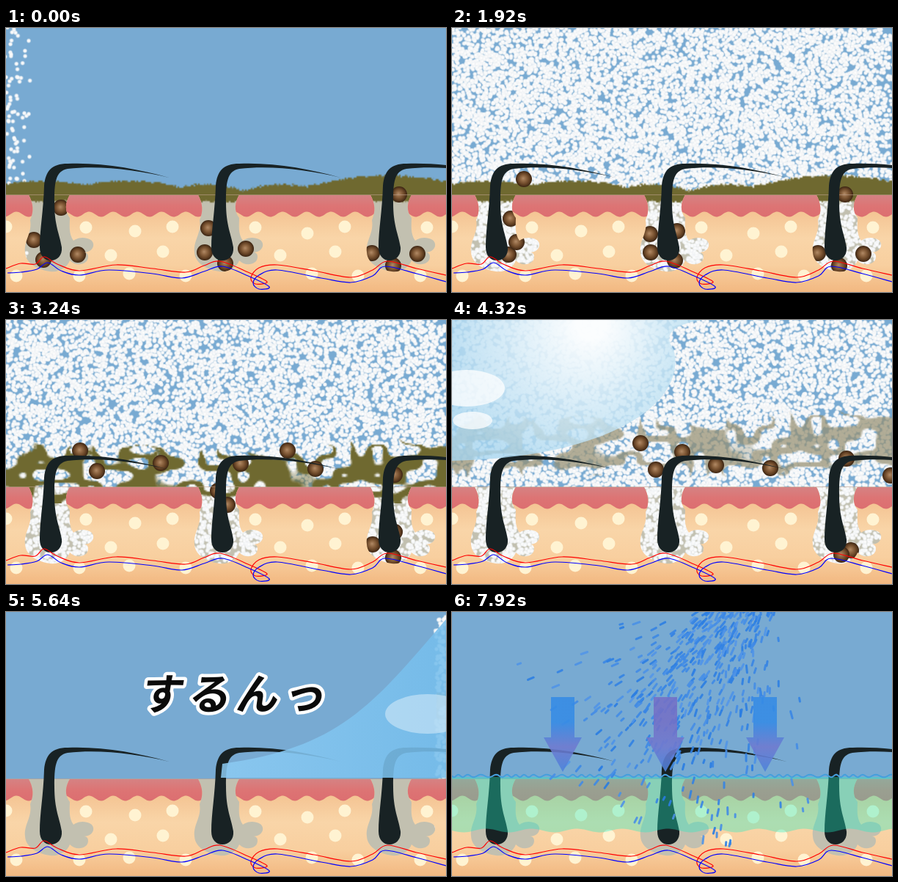
Animation, 600 px wide and 360 px high, one loop 8 s. Source, as an HTML page with a canvas:

```html
<!DOCTYPE html>
<html lang="ja">
<head>
<meta charset="utf-8">
<style>
html, body { margin: 0; width: 100%; height: 100%; overflow: hidden; background: #78aad2; }
canvas { display: block; }
</style>
</head>
<body>
<canvas id="stage" width="600" height="360"></canvas>
<script>
const W = 600, H = 360, LOOP = 8000, STEP = 120, SKIN_TOP = 228;
const ctx = document.getElementById('stage').getContext('2d');
const TAU = Math.PI * 2;
const clamp = (v, a = 0, b = 1) => Math.min(b, Math.max(a, v));
const ramp = (t, a, b) => clamp((t - a) / (b - a));
const mix = (a, b, k) => a + (b - a) * k;

let seed = 7;
function random() {
  seed = (seed + 0x6D2B79F5) | 0;
  let n = Math.imul(seed ^ (seed >>> 15), 1 | seed);
  n = (n + Math.imul(n ^ (n >>> 7), 61 | n)) ^ n;
  return ((n ^ (n >>> 14)) >>> 0) / 4294967296;
}
const hash = (x, y) => {
  const s = Math.sin(x * 127.1 + y * 311.7) * 43758.5453;
  return s - Math.floor(s);
};
function noise(x, y) {
  const ix = Math.floor(x), iy = Math.floor(y);
  const ease = v => v * v * (3 - 2 * v);
  const u = ease(x - ix), v = ease(y - iy);
  return 2 * mix(mix(hash(ix, iy), hash(ix + 1, iy), u),
                 mix(hash(ix, iy + 1), hash(ix + 1, iy + 1), u), v) - 1;
}
function makeCanvas(w, h) {
  const c = document.createElement('canvas');
  c.width = w; c.height = h;
  return c;
}
function gradient(g, ...colors) {
  colors.forEach((c, i) => g.addColorStop(i / (colors.length - 1), c));
  return g;
}
function ellipse(x, y, rx, ry, fill) {
  ctx.fillStyle = fill;
  ctx.beginPath();
  ctx.ellipse(x, y, rx, ry, 0, 0, TAU);
  ctx.fill();
}

// Skin
const PORE = new Path2D('M30 226C38 240 38 250 33 262C36 280 24 290 26 306C27 322 45 330 60 332' +
  'C72 334 84 326 87 317C95 326 112 323 112 312C112 307 109 306 106 306C121 306 124 290 111 287' +
  'C100 284 94 289 92 290C85 280 87 268 87 259C80 250 80 238 88 226Z');
const PORE_OFFSETS = [0, 231, 466], HAIR_OFFSETS = [0, 234, 462];
const skinShape = new Path2D();
skinShape.rect(0, SKIN_TOP, W, H - SKIN_TOP);
PORE_OFFSETS.forEach(x => skinShape.addPath(PORE, new DOMMatrix([1, 0, 0, 1, x, 0])));
const FAT = [[0, 271], [109, 272], [176, 277], [227, 271], [143, 310], [214, 305], [14, 338],
  [100, 338], [168, 335], [245, 338], [340, 272], [411, 280], [462, 271], [374, 310],
  [449, 305], [417, 335], [480, 338], [574, 272], [565, 338]];

function drawSkin() {
  ctx.save();
  ctx.clip(skinShape, 'evenodd');
  ctx.fillStyle = gradient(ctx.createLinearGradient(0, 250, 0, H), '#f4c493', '#f9d5a8', '#f8cf9f', '#f2b881');
  ctx.fillRect(0, SKIN_TOP, W, H);
  ctx.fillStyle = gradient(ctx.createLinearGradient(0, SKIN_TOP, 0, 258), '#d58283', '#dd7474', '#dc6e70');
  ctx.beginPath();
  ctx.moveTo(0, SKIN_TOP);
  for (let x = 0; x <= W; x += 2) ctx.lineTo(x, 254 + 3.5 * Math.sin(x * TAU / 33 + 2));
  ctx.lineTo(W, SKIN_TOP);
  ctx.fill();
  ctx.restore();
  ctx.fillStyle = 'rgba(190,160,140,.6)';
  ctx.fillRect(0, 227, W, 1);
  FAT.forEach(([x, y]) => ellipse(x, y, 8.5, 8.5, '#fff3d2'));
}

const HAIR = new Path2D('M222 204C180 192 130 183 84 185C62 185 54 195 52 215C51 250 46 275 46 299' +
  'C46 311 53 317 61 317C70 317 77 310 76 299C73 280 66 270 66 238C66 212 67 195 84 192C130 187 180 194 222 204Z');
function drawHair(x) {
  ctx.save();
  ctx.translate(x, 0);
  ctx.fillStyle = gradient(ctx.createLinearGradient(45, 0, 78, 6), '#0b1011', '#3a4a4c', '#10181a', '#06090a', '#182224');
  ctx.fill(HAIR);
  ctx.restore();
}

const RED = [0, 328, 20, 321, 40, 322, 52, 312, 70, 322, 100, 331, 150, 323, 200, 328, 245, 333,
  270, 324, 292, 318, 330, 333, 356, 346, 340, 349, 334, 340, 345, 327, 370, 323, 420, 331,
  470, 340, 500, 330, 520, 318, 560, 328, 600, 337];
const BLUE = [2, 334, 20, 333, 42, 329, 57, 320, 75, 331, 100, 337, 140, 330, 200, 335, 240, 341,
  270, 332, 295, 325, 330, 338, 359, 353, 345, 356, 337, 348, 345, 337, 370, 330, 430, 341,
  470, 347, 500, 338, 517, 325, 560, 335, 600, 346];
function drawVessel(p, color) {
  const at = i => { const k = clamp(i, 0, p.length / 2 - 1) * 2; return [p[k], p[k + 1]]; };
  ctx.strokeStyle = color;
  ctx.lineWidth = 1.2;
  ctx.beginPath();
  ctx.moveTo(p[0], p[1]);
  for (let i = 0; i < p.length / 2 - 1; i++) {
    const [a, b, c, d] = [at(i - 1), at(i), at(i + 1), at(i + 2)];
    ctx.bezierCurveTo(b[0] + (c[0] - a[0]) / 6, b[1] + (c[1] - a[1]) / 6,
      c[0] - (d[0] - b[0]) / 6, c[1] - (d[1] - b[1]) / 6, c[0], c[1]);
  }
  ctx.stroke();
}

// Foam
const dot = makeCanvas(8, 8);
{
  const d = dot.getContext('2d');
  const g = d.createRadialGradient(4, 4, 0, 4, 4, 3.3);
  g.addColorStop(0, '#fff');
  g.addColorStop(.6, 'rgba(246,247,248,.95)');
  g.addColorStop(1, 'rgba(232,238,242,0)');
  d.fillStyle = g;
  d.fillRect(0, 0, 8, 8);
}
const foam = Array.from({ length: 19000 }, () => ({
  x: random() * W, y: random() * 340, delay: random() * 230, keep: random(), phase: random() * TAU
}));
function drawFoam(t, clearX) {
  const edge = 40 + .38 * t, kept = 1 - .32 * ramp(t, 1000, 2300);
  for (const f of foam) {
    if (f.x + f.delay > edge || f.keep > kept || f.x < clearX) continue;
    const a = t / 300 + f.phase;
    ctx.drawImage(dot, f.x - 4 + 1.5 * Math.sin(a), f.y - 4 + 1.5 * Math.cos(a));
  }
}

// Dirt film: [peak x, peak y, curvature] for each mound
const MOUNDS = [[50, 207, .0017], [165, 207, .0017], [270, 212, .003], [375, 212, .003], [520, 200, .0012]];
const FILM_Y = 110, film = makeCanvas(W / 2, 70), filmCtx = film.getContext('2d');
const filmTop = x => Math.min(...MOUNDS.map(([cx, y, k]) => y + k * (x - cx) ** 2));
function drawFilm(t) {
  const broken = ramp(t, 2200, 3240), lift = Math.max(0, (t - 3300) / 1020), faded = clamp(lift);
  const img = filmCtx.createImageData(film.width, film.height);
  const soft = 2 + 14 * broken, cap = 1 - .85 * broken;
  const color = [mix(111, 150, faded), mix(105, 143, faded), mix(48, 112, faded)];
  for (let i = 0; i < film.width; i++) {
    const x = i * 2, top = filmTop(x) - 24 * broken - 40 * lift;
    const bottom = 237 + 5 * broken - 44 * lift;
    for (let j = 0; j < film.height; j++) {
      const y = FILM_Y + j * 2, grain = 3 * hash(i, j);
      if (y < top - 24 || y > bottom + 24) continue;
      let v = Math.min(cap, Math.min(y - top - grain + 1, bottom - y - grain) / soft);
      if (broken) {
        const ridge = .8 - 2.5 * Math.abs(noise(x / 23 + lift * .4, (y + 40 * lift) / 17 + broken * .6));
        v += broken * 1.2 * ridge;
      }
      const k = (j * film.width + i) * 4;
      img.data.set(color, k);
      img.data[k + 3] = 255 * mix(1, .72, faded) * clamp(v * 4 + .5);
    }
  }
  filmCtx.putImageData(img, 0, 0);
  ctx.drawImage(film, 0, FILM_Y, W, 140);
}

// Sebum balls: x, y at each of BALL_TIMES
const BALL_TIMES = [1000, 1920, 3240, 4320];
const BALLS = [
  [75, 245, 98, 206, 320, 196, 434, 202], [38, 289, 80, 260, 211, 195, 360, 198],
  [51, 316, 77, 309, 101, 178, 257, 168], [98, 309, 88, 292, 124, 206, 278, 204],
  [276, 273, 270, 281, 289, 233, 314, 180], [271, 306, 271, 306, 302, 252, 538, 189],
  [299, 321, 304, 317, 384, 178, 598, 212], [327, 301, 307, 277, 422, 203, 640, 200],
  [536, 227, 536, 227, 530, 211, 680, 190], [499, 307, 499, 307, 500, 306, 544, 314],
  [528, 324, 528, 324, 528, 324, 531, 320], [561, 308, 561, 308, 530, 289, 640, 200]];
function ballPosition(b, t) {
  let x = b[0], y = b[1];
  for (let i = 0; i < 3; i++) {
    const k = ramp(t, BALL_TIMES[i], BALL_TIMES[i + 1]);
    x += (b[i * 2 + 2] - b[i * 2]) * k;
    y += (b[i * 2 + 3] - b[i * 2 + 1]) * k;
  }
  const inPore = b[7] > SKIN_TOP, rise = ramp(t, 4320, 4900), leave = ramp(t, 4900, 5500);
  const midX = inPore ? 540 : b[6] + 200;
  return [x + (midX - b[6]) * rise + (midX < 800 ? (800 - midX) * leave : 0),
          y + ((inPore ? 210 : y - 10) - y) * rise];
}
function drawBall([x, y]) {
  const g = ctx.createRadialGradient(x - 1, y - 1, 0, x, y, 11);
  ellipse(x, y, 11, 11, gradient(g, '#b18a66', '#8f6743', '#6b4728', '#3b2412'));
}

// Rinsing wave
function drawWave(t) {
  const front = 310 + .65 * (t - 4320), tail = front - 875;
  if (front < -20 || tail > W) return;
  ctx.beginPath();
  ctx.moveTo(front + 30, 0);
  ctx.quadraticCurveTo(front - 30, 10, front - 8, 40);
  ctx.bezierCurveTo(front + 12, 110, front - 90, 188, front - 310, 192);
  ctx.quadraticCurveTo(front - 400, 226, front - 450, 226);
  ctx.lineTo(tail, 226);
  ctx.lineTo(tail + 2, 207);
  ctx.bezierCurveTo(tail + 160, 185, tail + 205, 130, tail + 307, 10);
  ctx.lineTo(tail + 316, 0);
  ctx.fillStyle = gradient(ctx.createLinearGradient(tail, 0, front, 0),
    'rgba(140,203,243,.85)', 'rgba(118,190,236,.88)', 'rgba(170,215,240,.8)', 'rgba(160,212,238,.72)');
  ctx.fill();
  ctx.save();
  ctx.clip();
  ctx.fillStyle = gradient(ctx.createRadialGradient(front - 120, 5, 20, front - 140, 20, 190),
    'rgba(255,255,255,.95)', 'rgba(255,255,255,.45)', 'rgba(255,255,255,0)');
  ctx.fillRect(0, 0, W, 230);
  ellipse(front - 290, 93, 52, 25, 'rgba(255,255,255,.75)');
  ellipse(front - 282, 137, 27, 12, 'rgba(255,255,255,.75)');
  ellipse(tail + 282, 139, 58, 27, 'rgba(225,242,252,.5)');
  ctx.restore();
}

function drawWord(t) {
  const alpha = ramp(t, 5100, 5400) * (1 - ramp(t, 6000, 6360));
  if (!alpha) return;
  ctx.save();
  ctx.globalAlpha = alpha;
  ctx.font = '900 58px "Noto Sans CJK JP", "Noto Sans CJK", sans-serif';
  ctx.textAlign = 'center';
  ctx.lineJoin = 'round';
  ctx.lineWidth = 9;
  ctx.strokeStyle = '#fff';
  ctx.fillStyle = '#0a0a0a';
  for (const method of ['strokeText', 'fillText']) {
    [...'するんっ'].forEach((c, i) => {
      ctx.setTransform(1, 0, -.16, 1, 211 + i * 65, 133);
      ctx[method](c, 0, 0);
    });
  }
  ctx.restore();
}

// Lotion spray, soaking layer and arrows
const spray = Array.from({ length: 900 }, () => ({
  phase: random(), angle: .54 + (random() + random() + random() - 1.5) * .62,
  shift: (random() - .5) * 90, reach: 120 + 240 * random(), length: 4 + 6 * random(), light: 52 + 10 * random()
}));
function drawSpray(t) {
  if (t < 6360) return;
  const source = 405 + (7920 - t) * .25;
  ctx.lineWidth = 3;
  ctx.lineCap = 'round';
  for (const s of spray) {
    const d = 360 * ((t / 620 + s.phase) % 1);
    if (d > s.reach) continue;
    const dx = -Math.sin(s.angle), dy = Math.cos(s.angle);
    const x = source + s.shift + dx * d, y = -25 + dy * d;
    ctx.strokeStyle = `hsla(213,76%,${s.light}%,.9)`;
    ctx.beginPath();
    ctx.moveTo(x, y);
    ctx.lineTo(x + dx * s.length, y + dy * s.length);
    ctx.stroke();
  }
  ctx.lineCap = 'butt';
}
function drawSoak(t) {
  const k = ramp(t, 6960, 7920);
  if (!k) return;
  const bottom = mix(SKIN_TOP, 298, k);
  ctx.fillStyle = 'rgba(35,235,195,.36)';
  ctx.beginPath();
  ctx.moveTo(W, 225);
  ctx.lineTo(0, 225);
  for (let x = 0; x <= W; x += 4) ctx.lineTo(x, bottom + 2.5 * Math.sin(x * TAU / 62));
  ctx.fill();
  ctx.strokeStyle = '#469fdd';
  ctx.lineWidth = 2;
  ctx.beginPath();
  for (let x = 0; x <= W; x += 2) ctx.lineTo(x, 223.5 + 1.8 * Math.sin(x * .42 + 2 * Math.sin(x * .07)));
  ctx.stroke();
}
const ARROW = new Path2D('M-16 116H16V171H26L0 218L-26 171H-16Z');
function drawArrows(t) {
  const alpha = ramp(t, 6000, 6360);
  if (!alpha) return;
  [[151, '#358be5'], [291, '#7470c6'], [427, '#358be5']].forEach(([x, color]) => {
    ctx.save();
    ctx.globalAlpha = alpha * .88;
    ctx.translate(x, 0);
    ctx.fillStyle = gradient(ctx.createLinearGradient(0, 116, 0, 218), color, color, '#6f79cf', '#4a82dc');
    ctx.fill(ARROW);
    ctx.restore();
  });
}

function draw(t) {
  const clearX = 587 + .65 * (t - 5640);
  ctx.fillStyle = '#78aad2';
  ctx.fillRect(0, 0, W, H);
  ctx.fillStyle = '#c2c0b0';
  ctx.fillRect(0, SKIN_TOP, W, H - SKIN_TOP);
  if (clearX < W) {
    drawFoam(t, clearX);
    ctx.save();
    ctx.beginPath();
    ctx.rect(Math.max(0, clearX), 0, W, H);
    ctx.clip();
    drawFilm(t);
    BALLS.forEach(b => drawBall(ballPosition(b, t)));
    ctx.restore();
  }
  drawSkin();
  HAIR_OFFSETS.forEach(drawHair);
  drawVessel(RED, '#f00');
  drawVessel(BLUE, '#00f');
  drawWave(t);
  drawWord(t);
  drawSoak(t);
  drawSpray(t);
  drawArrows(t);
}

let shown = -1;
function tick() {
  const t = Math.floor(performance.now() % LOOP / STEP) * STEP;
  if (t !== shown) draw(shown = t);
  requestAnimationFrame(tick);
}
tick();
</script>
</body>
</html>
```
